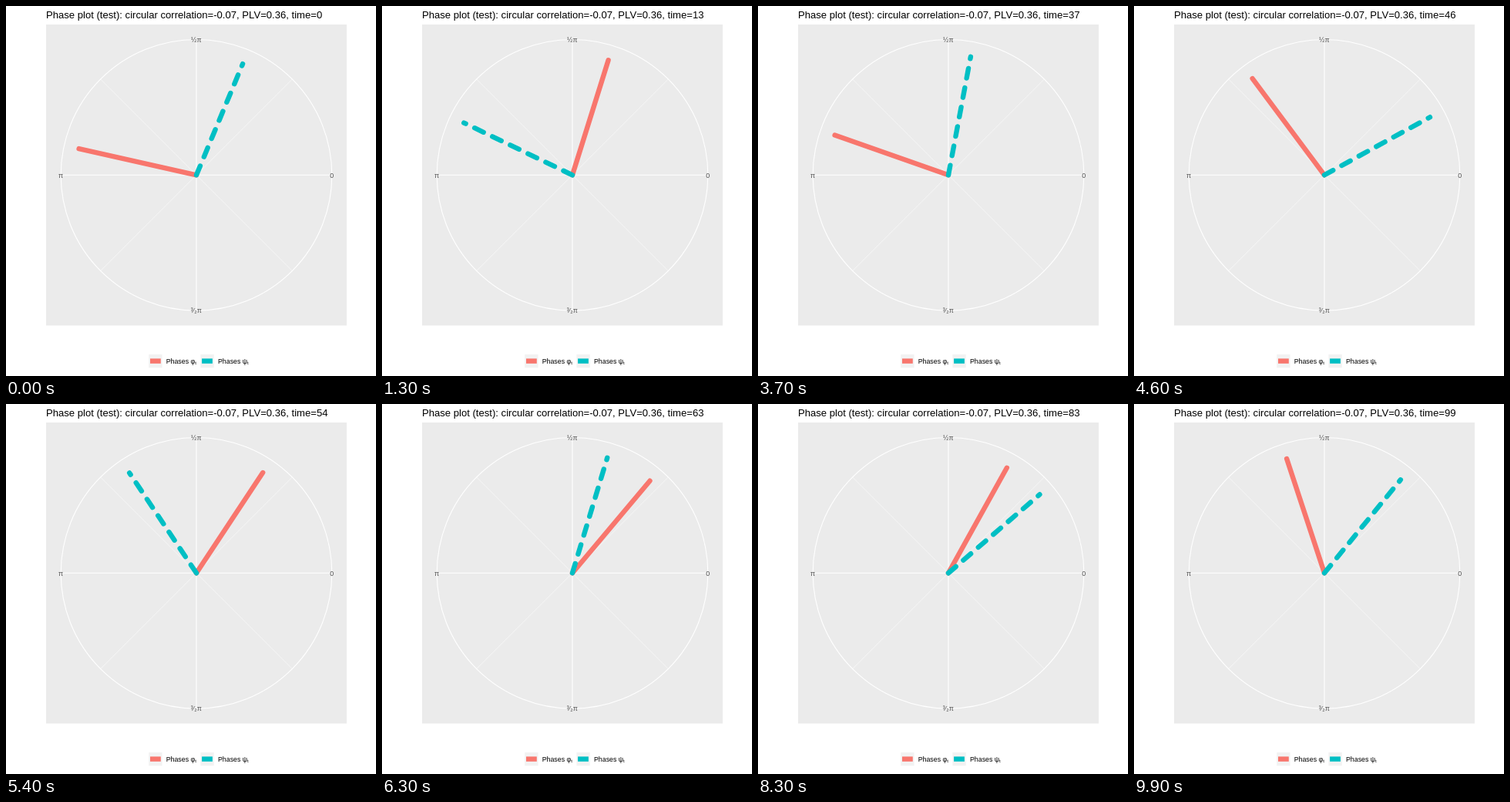
These frames come from a looping animation (480 px wide and 480 px high, 10 s). An HTML page:

```html
<!DOCTYPE html>
<html lang="en">
<head>
<meta charset="utf-8">
<title>Phase plot</title>
<style>
  html, body { margin: 0; width: 100%; height: 100%; overflow: hidden; background: #fff; }
  svg { display: block; width: 100vw; height: 100vh; }
  text { font-family: "Liberation Sans", Arial, sans-serif; font-size: 8.8px; }
  #title { font-size: 13.1px; }
  .axis { fill: #4d4d4d; text-anchor: middle; }
  .grid { fill: none; stroke: #fff; stroke-width: 1.07; }
  .minor { stroke-width: .53; }
  .hand { stroke-width: 6.4; stroke-linecap: round; }
  .key { stroke-width: 6.4; }
  .sub { font-size: 6.2px; }
  .phi { stroke: #f8766d; }
  .psi { stroke: #00bfc4; }
  .hand.psi { stroke-dasharray: 12.8; }
</style>
</head>
<body>
<svg viewBox="0 0 480 480">
  <text id="title" x="52" y="15.5"></text>
  <rect x="52" y="24" width="390" height="390.5" fill="#ebebeb"/>
  <g transform="translate(247 219.3)">
    <path class="grid minor" d="M-124.3-124.3 124.3 124.3M-124.3 124.3 124.3-124.3"/>
    <path class="grid" d="M-175.8 0H175.8M0-175.8V175.8"/>
    <circle class="grid" r="175.8"/>
    <line id="phi" class="hand phi" x2="156.2"/>
    <line id="psi" class="hand psi" x2="156.2"/>
  </g>
  <text class="axis" x="422.7" y="222.5">0</text>
  <text class="axis" x="246.8" y="46.8">½π</text>
  <text class="axis" x="71" y="222.5">π</text>
  <text class="axis" x="246.8" y="398.3">³⁄₂π</text>
  <g fill="#f2f2f2">
    <rect x="185.2" y="452" width="17.3" height="17.3"/>
    <rect x="252.4" y="452" width="17.3" height="17.3"/>
  </g>
  <path class="key phi" d="M187 460.6h13.8"/>
  <path class="key psi" d="M254.1 460.6h13.8"/>
  <text x="207.7" y="463.8">Phases φ<tspan class="sub" dy="1.5">t</tspan></text>
  <text x="275" y="463.8">Phases ψ<tspan class="sub" dy="1.5">t</tspan></text>
</svg>
<script>
  const STEP = 100, COUNT = 100, RATE = 0.6;
  // Drift of phi against the steady rotation: [time, radians]
  const DRIFT = [[0, 2.921], [25, 2.866], [37, 2.595], [54, 3.144],
                 [71, 4.596], [83, 4.671], [99, 5.321]];
  const title = document.getElementById("title");
  const phi = document.getElementById("phi");
  const psi = document.getElementById("psi");

  function drift(t) {
    const i = Math.max(1, DRIFT.findIndex(p => p[0] >= t));
    const [t0, a] = DRIFT[i - 1], [t1, b] = DRIFT[i];
    return a + (b - a) * (t - t0) / (t1 - t0);
  }

  function turn(hand, angle) {
    const degrees = (angle % Math.PI) * 180 / Math.PI;
    hand.setAttribute("transform", `rotate(${-degrees})`);
  }

  let shown = -1;
  function draw() {
    const t = Math.floor(performance.now() / STEP) % COUNT;
    if (t !== shown) {
      shown = t;
      title.textContent = `Phase plot (test): circular correlation=-0.07, PLV=0.36, time=${t}`;
      turn(phi, RATE * t + drift(t));
      turn(psi, RATE * t + 1.176);
    }
    requestAnimationFrame(draw);
  }
  draw();
</script>
</body>
</html>
```
